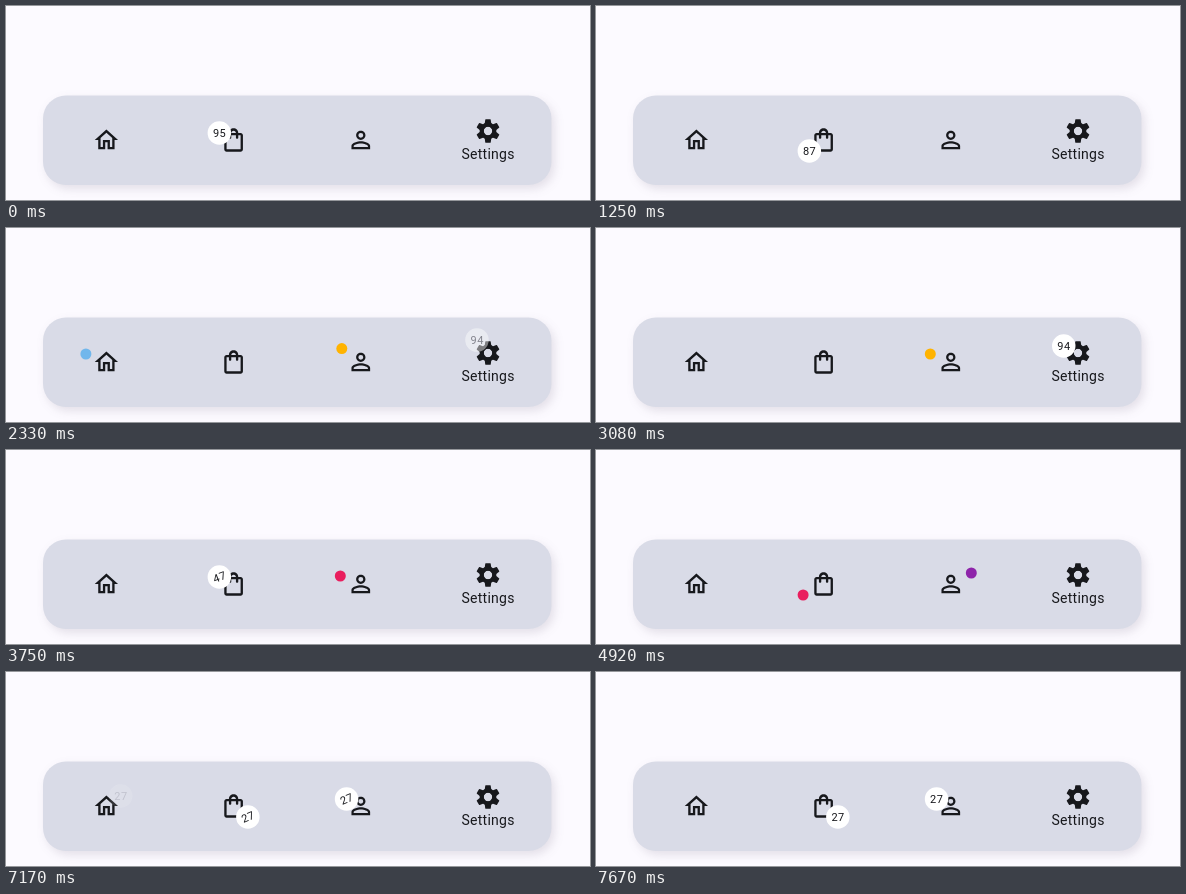
These frames come from a looping animation (584 px wide and 194 px high, 8000 ms). An HTML page:

```html
<!DOCTYPE html>
<html lang="en">
<head>
<meta charset="utf-8">
<title>Navigation bar badges</title>
<style>
html, body { margin: 0; width: 100%; height: 100%; overflow: hidden; background: #fcfaff; }
svg { display: block; width: 584px; height: 194px; }
text { font-family: Roboto, sans-serif; text-anchor: middle; fill: #17181c; }
.bar { fill: #d9dbe7; filter: drop-shadow(3px 4px 5px rgba(60, 50, 80, .13)); }
.icon { fill: #17181c; }
.label { font-size: 14px; letter-spacing: .25px; }
.count { font-size: 11px; letter-spacing: .5px; }
</style>
</head>
<body>
<svg id="stage" viewBox="0 0 584 194" xmlns="http://www.w3.org/2000/svg">
  <rect class="bar" x="37" y="89.5" width="508.5" height="89.5" rx="23"/>
  <g class="icon" id="icons"></g>
  <text class="label" x="482.1" y="153">Settings</text>
  <g id="badges"></g>
</svg>
<script>
const NS = 'http://www.w3.org/2000/svg';
const LOOP = 8000, FPS = 12, RUN = 500, FADE = 200;

const HOME = 0, BAG = 1, PERSON = 2, GEAR = 3;
const centers = [HOME, BAG, PERSON, GEAR].map(i => ({ x: 100.4 + 127.2 * i, y: i === GEAR ? 125 : 134 }));

const paths = [
  'M12 5.69l5 4.5V18h-2v-6H9v6H7v-7.81l5-4.5M12 3L2 12h3v8h6v-6h2v6h6v-8h3L12 3z',
  'M18 6h-2c0-2.21-1.79-4-4-4S8 3.79 8 6H6c-1.1 0-2 .9-2 2v12c0 1.1.9 2 2 2h12c1.1 0 2-.9 2-2V8c0-1.1-.9-2-2-2z' +
    'm-6-2c1.1 0 2 .9 2 2h-4c0-1.1.9-2 2-2zm6 16H6V8h2v2c0 .55.45 1 1 1s1-.45 1-1V8h4v2c0 .55.45 1 1 1s1-.45 1-1V8h2v12z',
  'M12 5.9a2.1 2.1 0 1 1 0 4.2 2.1 2.1 0 0 1 0-4.2m0 9c2.97 0 6.1 1.46 6.1 2.1v1.1H5.9V17c0-.64 3.13-2.1 6.1-2.1' +
    'M12 4C9.79 4 8 5.79 8 8s1.79 4 4 4 4-1.79 4-4-1.79-4-4-4zm0 9c-2.67 0-8 1.34-8 4v3h16v-3c0-2.66-5.33-4-8-4z'
];
const tooth = 'M9.24 5.35L9.65 2.45Q9.72 2 10.15 2H13.85Q14.28 2 14.35 2.45L14.76 5.35L14 9H10z';

function add(parent, tag, attrs) {
  const el = document.createElementNS(NS, tag);
  for (const k in attrs) el.setAttribute(k, attrs[k]);
  return parent.appendChild(el);
}

centers.forEach((c, i) => {
  const size = 28 / 24;
  const g = add(document.getElementById('icons'), 'g', {
    transform: `translate(${c.x - 14} ${c.y - 14}) scale(${size})`
  });
  if (i < GEAR) {
    add(g, 'path', { d: paths[i], 'fill-rule': 'evenodd' });
    return;
  }
  for (let a = 0; a < 360; a += 60) add(g, 'path', { d: tooth, transform: `rotate(${a} 12 12)` });
  add(g, 'circle', { cx: 12, cy: 12, r: 3.8, fill: '#d9dbe7' });
  add(g, 'circle', { cx: 12, cy: 12, r: 5.4, fill: 'none', stroke: '#17181c', 'stroke-width': 3.6 });
});

const BLUE = '#1e9bf0', AMBER = '#ffb300', PINK = '#e91e5e', PURPLE = '#8e24aa', GREEN = '#43a047';

// Each badge: corner, count or dot colour, motion ("out" fades it away).
const steps = [
  { at: 0, lead: 1000, [BAG]: ['TL', 95] },
  { at: 1250, lead: 0, [HOME]: ['BR', 87, 'spin'], [BAG]: ['BL', 87, 'out'], [PERSON]: ['BR', 87, 'spin'] },
  { at: 2330, lead: 85, [HOME]: ['TL', BLUE, 'out'], [PERSON]: ['TL', AMBER, 'slide'], [GEAR]: ['TL', 94, 'slide'] },
  { at: 3580, lead: 35, [BAG]: ['TL', 47, 'spin'], [PERSON]: ['TL', PINK, 'spin'], [GEAR]: ['TR', 47, 'out'] },
  { at: 4580, lead: 20, [BAG]: ['BL', PINK, 'spin'], [PERSON]: ['TR', PURPLE, 'scale'] },
  { at: 5580, lead: 40, [BAG]: ['BL', PINK, 'out'], [PERSON]: ['TR', PURPLE, 'out'] },
  { at: 6000, lead: 20, [HOME]: ['BL', 3, 'spin'], [BAG]: ['TL', GREEN, 'spin'], [PERSON]: ['TR', 3, 'spin'] },
  { at: 7000, lead: 10, [HOME]: ['TR', 27, 'out'], [BAG]: ['BR', 27, 'spin'], [PERSON]: ['TL', 27, 'spin'] }
];

const badges = centers.map(() => {
  const g = add(document.getElementById('badges'), 'g', {});
  return { g, disc: add(g, 'circle', {}), text: add(g, 'text', { class: 'count', x: .25, y: 3.9 }) };
});

function elastic(t) {
  if (t <= 0) return 0;
  if (t >= 1) return 1;
  return 1 + 2 ** (-10 * t) * Math.sin((t - .1) * 5 * Math.PI);
}

const shown = b => b && b[2] !== 'out';

function drawBadge(i, data, before, age) {
  const { g, disc, text } = badges[i];
  if (!data) { g.setAttribute('opacity', 0); return; }
  const [corner, value, motion] = data;
  const dot = typeof value === 'string';
  const r = dot ? 5.5 : value > 9 ? 11.75 : 8.5;
  const fade = Math.min(1, age / FADE);
  const e = elastic(age / RUN);

  let x = centers[i].x + (corner[1] === 'L' ? r - 26 : 26 - r);
  let y = centers[i].y + (corner[0] === 'B' ? 11 : (corner[1] === 'L' ? -7 : -10) - (dot ? 1 : 0));
  if (motion === 'slide') {
    x -= .5 * (1 - e) * 2 * r;
    y += .9 * (1 - e) * (dot ? 22 : 24);
  }
  const scale = motion === 'scale' ? e : 1;
  const turn = motion === 'spin' ? 360 * e : 0;

  g.setAttribute('opacity', motion === 'out' ? 1 - fade : shown(before) ? 1 : fade);
  g.setAttribute('transform', `translate(${x} ${y}) scale(${scale})`);
  disc.setAttribute('r', r);
  disc.setAttribute('fill', dot ? value : '#fff');
  text.textContent = dot ? '' : value;
  text.setAttribute('transform', `rotate(${turn})`);
}

function draw(ms) {
  // The motion runs at 12 pictures per second.
  const t = Math.floor((ms % LOOP + 4) * FPS / 1000) * 1000 / FPS;
  let n = 0;
  while (n + 1 < steps.length && steps[n + 1].at <= t + 1) n++;
  const step = steps[n], last = n ? steps[n - 1] : step;
  const age = t - step.at + step.lead;
  badges.forEach((_, i) => drawBadge(i, step[i], last[i], age));
}

const start = performance.now();
function tick() {
  draw(performance.now() - start);
  requestAnimationFrame(tick);
}
tick();
</script>
</body>
</html>
```
